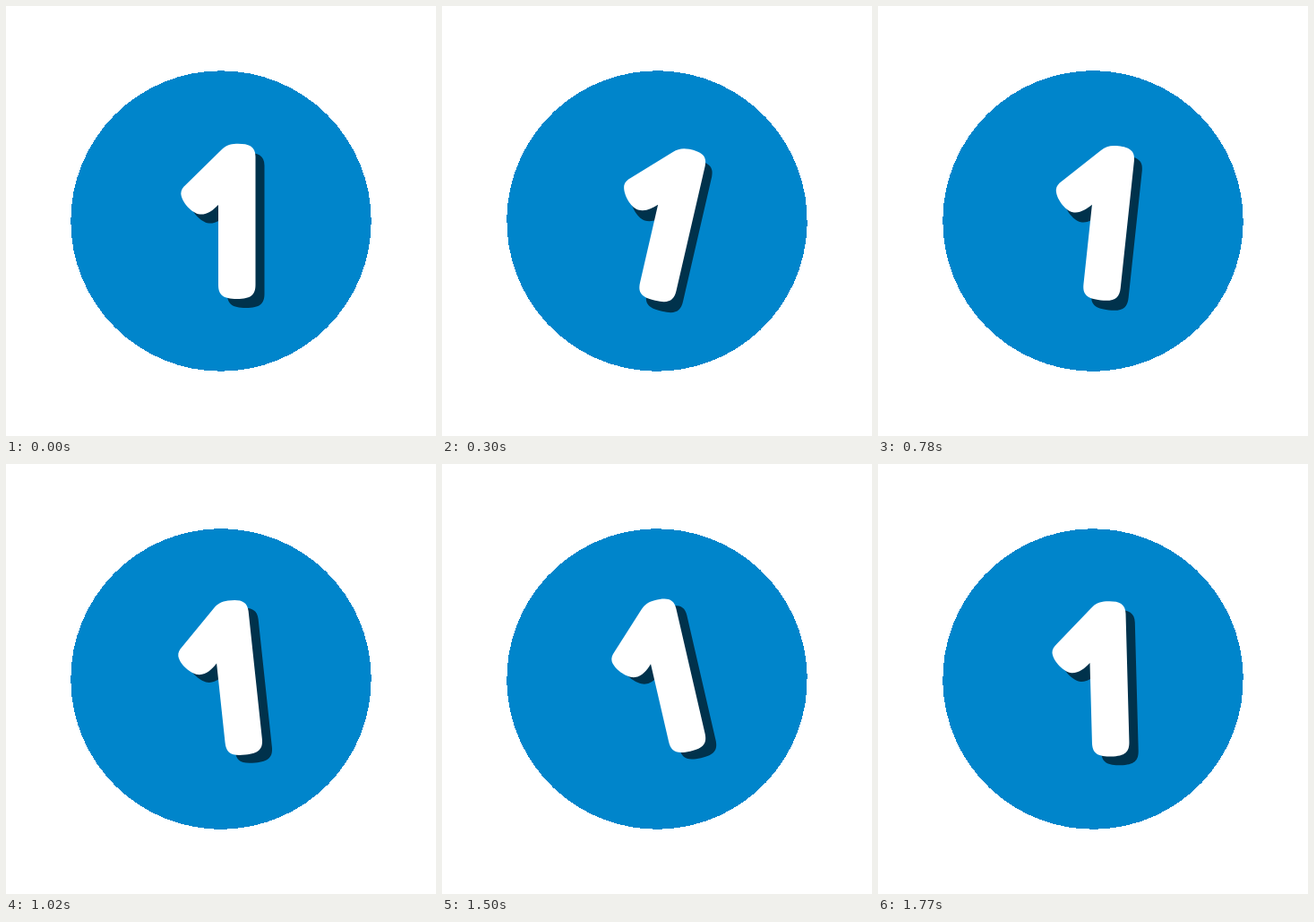
Animation, 480 px wide and 480 px high, one loop 1800 ms. Source, as an HTML page:

```html
<!DOCTYPE html>
<html lang="en">
<head>
<meta charset="utf-8">
<title>Rocking number one</title>
<style>
  html, body { margin: 0; width: 100%; height: 100%; overflow: hidden; background: #fff; }
  svg { display: block; width: 100vw; height: 100vh; }
</style>
</head>
<body>
<svg viewBox="0 0 480 480" role="img" aria-label="1">
  <defs>
    <path id="one" d="M257 153.8 C270 153.5 278.5 156 278.5 168 V311
      C278.5 322.5 273.5 327 258 327 C242 327 237 322.5 237 311 V222
      C231 228 225 233 216.5 232.6 C207.5 231.5 196 219 195.3 209.5
      C195.3 205.5 197.5 202.5 200.5 199.8 L240 161 C245 156 250 154 257 153.8 Z"/>
  </defs>
  <g id="badge">
    <circle cx="240" cy="240" r="167.7" fill="#0085cb" shape-rendering="crispEdges"/>
    <use href="#one" x="10" y="10" fill="#00324c"/>
    <use href="#one" fill="#fff"/>
  </g>
</svg>
<script>
  const LOOP = 1800, STEP = 30, SWING = 15;
  const badge = document.getElementById('badge');

  // The swing is a sine held for one step at a time.
  function draw() {
    const time = Math.floor((performance.now() + 1) / STEP) * STEP % LOOP;
    const angle = SWING * Math.sin(2 * Math.PI * time / LOOP);
    badge.setAttribute('transform', `rotate(${angle} 240 240)`);
    requestAnimationFrame(draw);
  }
  draw();
</script>
</body>
</html>
```
